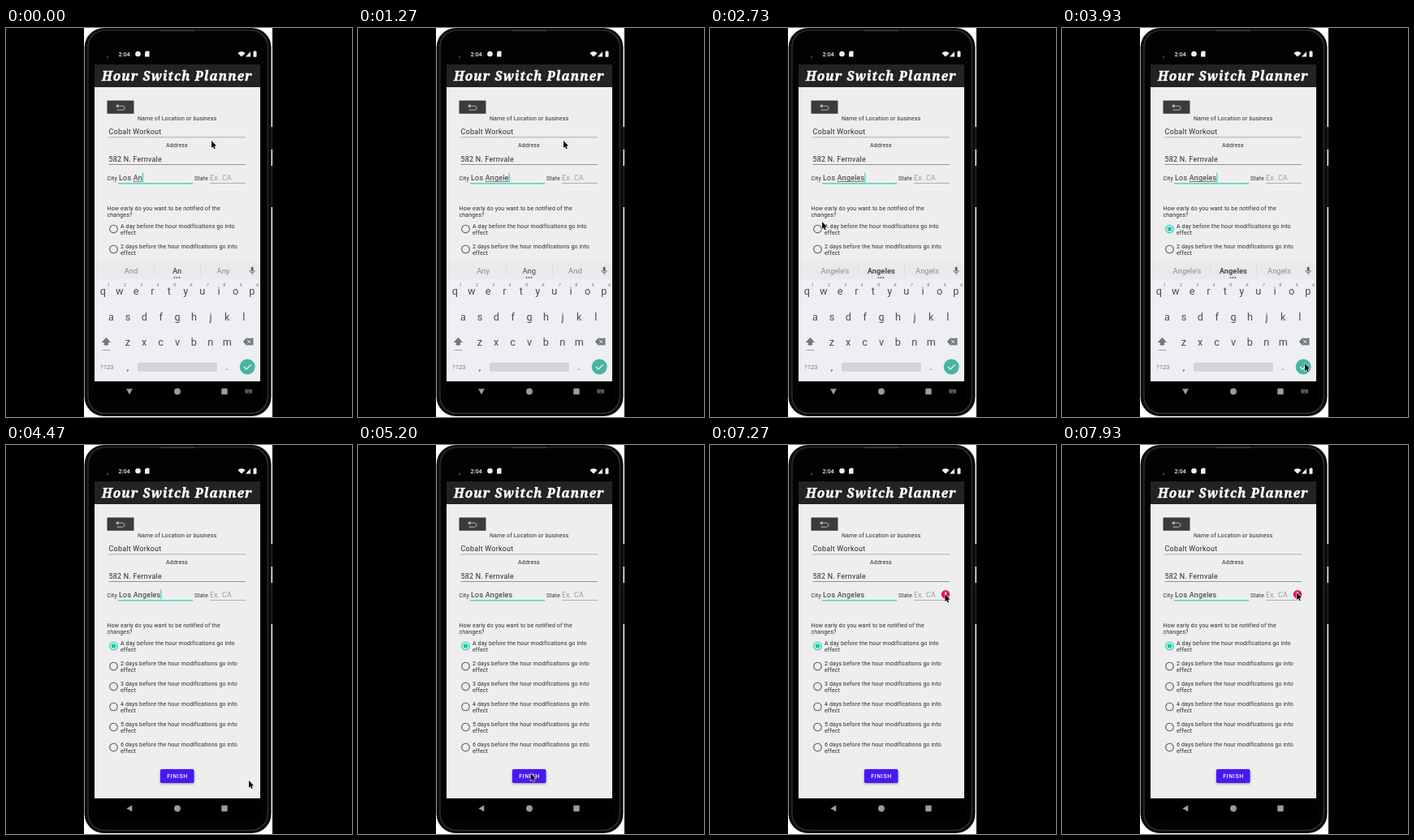
An HTML page with a canvas for the animation above (8000 ms loop, 426 by 480 pixels).

```html
<!DOCTYPE html>
<html lang="en">
<head>
<meta charset="utf-8">
<title>Form entry</title>
<style>
html, body { margin: 0; width: 100%; height: 100%; overflow: hidden; background: #000; }
canvas { display: block; width: 426px; height: 480px; }
</style>
</head>
<body>
<canvas id="stage"></canvas>
<script>
const W = 426, H = 480, LOOP = 8000;
const canvas = document.getElementById('stage');
const dpr = window.devicePixelRatio || 1;
canvas.width = W * dpr;
canvas.height = H * dpr;
const ctx = canvas.getContext('2d');

const TEAL = '#19c9b5', INK = '#2a2a2a';
const typed = [[0, 'An'], [400, 'Ang'], [930, 'Ange'], [1070, 'Angel'], [1270, 'Angele'], [1470, 'Angeles']];
const hints = [
  [0, { words: ['And', 'An', 'Any'], weight: 500 }],
  [500, { words: ['Any', 'Ang', 'And'], weight: 400 }],
  [1330, { words: ['Angel', 'Angele', 'Angels'], weight: 400 }],
  [1670, { words: ["Angele's", 'Angeles', 'Angels'], weight: 700 }]
];
const pointerPath = [
  [0, 253, 139], [1880, 253, 139], [1930, 250, 152], [2010, 250, 152], [2330, 141, 235],
  [2450, 141, 235], [2730, 138, 239], [2870, 131, 245], [3210, 131, 245], [3800, 297, 411],
  [3930, 299, 414], [4810, 299, 414], [4930, 252, 409], [5010, 252, 409], [5200, 212.5, 405],
  [6210, 212.5, 405], [6600, 290, 211], [6740, 290, 211], [6930, 293, 203], [7040, 293, 203],
  [7330, 289, 182], [8000, 289, 182]
];
const CHECKED = 3130, CLOSING = 4130, PRESSED = 5870, INVALID = 5930;

const latest = (list, t) => list.filter(item => item[0] <= t).pop()[1];
const clamp = v => Math.max(0, Math.min(1, v));
const smooth = v => v * v * (3 - 2 * v);

function pointerAt(t) {
  const i = Math.max(1, pointerPath.findIndex(p => p[0] > t));
  const a = pointerPath[i - 1], b = pointerPath[i];
  const k = smooth((t - a[0]) / (b[0] - a[0]));
  return [a[1] + (b[1] - a[1]) * k, a[2] + (b[2] - a[2]) * k];
}

function rect(x, y, w, h, color, r = 0) {
  ctx.fillStyle = color;
  ctx.beginPath();
  ctx.roundRect(x, y, w, h, r);
  ctx.fill();
}

function circle(x, y, r, color) {
  ctx.fillStyle = color;
  ctx.beginPath();
  ctx.arc(x, y, r, 0, Math.PI * 2);
  ctx.fill();
}

function poly(points, color) {
  ctx.fillStyle = color;
  ctx.beginPath();
  points.forEach(([x, y]) => ctx.lineTo(x, y));
  ctx.closePath();
  ctx.fill();
}

function line(points, color, width = 1) {
  ctx.strokeStyle = color;
  ctx.lineWidth = width;
  ctx.beginPath();
  points.forEach(([x, y]) => ctx.lineTo(x, y));
  ctx.stroke();
}

function text(str, x, y, { size = 7, color = INK, align = 'left', weight = 400, gap = 0.15,
                          family = 'Roboto, sans-serif', style = '' } = {}) {
  ctx.font = `${style} ${weight} ${size}px ${family}`;
  ctx.letterSpacing = gap + 'px';
  ctx.textAlign = align;
  ctx.fillStyle = color;
  ctx.fillText(str, x, y);
  return ctx.measureText(str).width;
}

const field = (str, x, y, color = INK) => text(str, x, y, { size: 8.93, gap: 0.25, color });

function drawPhone() {
  rect(0, 0, W, H, '#000');
  rect(96, 0, 232, H, '#fff');
  rect(326, 122, 2, 28, '#25292c');
  rect(326, 170, 2, 51, '#25292c');
  rect(96.6, 0, 230, 479, '#0c0c0c', 24);
  rect(100.4, 2.4, 222.4, 473.6, '#353535', 21);
  rect(101.6, 3.6, 220, 471.2, '#020202', 20);
  rect(190, 2.5, 42, 1.5, '#3a3a3a', 0.7);
}

function drawStatusBar() {
  const white = '#f2f2f2';
  circle(125, 36, 1.3, '#39424a');
  text('2:04', 138.5, 34.5, { size: 7.2, color: white, weight: 500, gap: 0 });
  circle(162.5, 32, 3.3, white);
  poly([[172.5, 28.5], [176.5, 28.5], [176.5, 35.5], [171, 35.5], [171, 30.3]], white);
  ctx.fillStyle = white;
  ctx.beginPath();
  ctx.moveTo(290, 35.5);
  ctx.arc(290, 35.5, 6.5, -Math.PI * 0.75, -Math.PI * 0.25);
  ctx.fill();
  poly([[295, 35.5], [301, 35.5], [301, 29]], white);
  rect(304.5, 29, 4, 6.7, white, 0.6);
  rect(305.6, 28.2, 1.8, 1.2, white);
}

function drawHeader() {
  const title = 'Hour Switch Planner';
  rect(109, 45, 204, 28, '#222325');
  text(title, 210.8, 64.5, {
    size: 15.4, color: '#fff', align: 'center', weight: 900, gap: 1.1, style: 'italic',
    family: '"Noto Serif", serif'
  });
  ctx.strokeStyle = '#fff';
  ctx.lineWidth = 0.5;
  ctx.strokeText(title, 210.8, 64.5);
}

function drawBackButton() {
  const gray = '#b8b8b8';
  rect(124.5, 89.5, 33, 16.3, '#3b3b3d');
  ctx.strokeStyle = gray;
  ctx.lineWidth = 1;
  ctx.beginPath();
  ctx.moveTo(137, 96.2);
  ctx.lineTo(143.5, 96.2);
  ctx.arc(143.5, 98.7, 2.5, -Math.PI / 2, Math.PI / 2);
  ctx.lineTo(136.5, 101.2);
  ctx.stroke();
  poly([[135, 96.2], [138.3, 93.6], [138.3, 98.8]], gray);
}

function drawRadio(i, on) {
  const y = 248 + 25 * i;
  ctx.strokeStyle = on ? TEAL : '#5c5c5c';
  ctx.lineWidth = 1.1;
  ctx.beginPath();
  ctx.arc(132.5, y, 4.8, 0, Math.PI * 2);
  ctx.stroke();
  if (on) circle(132.5, y, 2.8, TEAL);
  const when = i ? `${i + 1} days` : 'A day';
  text(`${when} before the hour modifications go into`, 141, y - 1);
  text('effect', 141, y + 7.3);
}

function drawFinish(t) {
  ctx.save();
  ctx.shadowColor = 'rgba(0,0,0,.4)';
  ctx.shadowBlur = 3 * dpr;
  ctx.shadowOffsetY = dpr;
  rect(190, 400, 41.5, 17, '#4a17f2', 1.8);
  ctx.restore();
  const glow = t < PRESSED ? 0 : 0.2 * clamp(1 - (t - PRESSED) / 300);
  if (glow) rect(190, 400, 41.5, 17, `rgba(255,255,255,${glow})`, 1.8);
  text('FINISH', 211, 411, { size: 7, color: '#fff', align: 'center', weight: 500, gap: 0.62 });
}

function drawCity(t) {
  const word = latest(typed, t);
  const lead = field('Los ', 139, 188);
  const end = 139 + lead + field(word, 139 + lead, 188);
  rect(138, 191.2, 92, 1.3, '#2fc9b8');
  if (t < CLOSING) rect(139 + lead, 189.2, end - 139 - lead, 0.7, '#555');
  const blink = Math.floor((t - 1470) / 495);
  if (t < 1470 || blink % 2 === 0) rect(end, 178.5, 1, 11.8, TEAL);
}

function drawError() {
  circle(290, 184.2, 5.2, '#ed1540');
  rect(289.3, 181, 1.5, 4, '#fff', 0.3);
  rect(289.3, 186, 1.5, 1.5, '#fff', 0.3);
}

function drawForm(t) {
  rect(109, 73, 204, 363, '#eeeeef');
  drawBackButton();
  text('Name of Location or business', 210.7, 114, { align: 'center' });
  field('Cobalt Workout', 126.5, 131);
  rect(126, 134.4, 169, 0.9, '#999');
  text('Address', 210.5, 147.3, { align: 'center' });
  field('582 N. Fernvale', 126.5, 164.5);
  rect(126, 167.9, 169, 0.9, '#777');
  text('City', 124.5, 187.6);
  drawCity(t);
  text('State', 232, 187.6);
  field('Ex. CA', 251, 188, '#999');
  rect(251, 191.2, 44, 0.9, '#999');
  if (t >= INVALID) drawError();
  text('How early do you want to be notified of the', 124.5, 225);
  text('changes?', 124.5, 233.3);
  for (let i = 0; i < 6; i++) drawRadio(i, i === 0 && t >= CHECKED);
  drawFinish(t);
}

function drawSuggestions(t) {
  const { words, weight } = latest(hints, t);
  words.forEach((word, i) => {
    const mid = i === 1;
    text(word, 154 + 56.7 * i, 303, {
      size: 9.4, align: 'center', gap: 0, color: mid ? '#45494c' : '#858a8d', weight: mid ? weight : 400
    });
  });
  [182.5, 239].forEach(x => rect(x, 293, 0.7, 13, '#d6d9db'));
  [-3, 0, 3].forEach(dx => circle(210.5 + dx, 308, 0.9, '#555'));
  rect(301.7, 294.5, 3, 6, '#666', 1.5);
  ctx.strokeStyle = '#666';
  ctx.lineWidth = 0.9;
  ctx.beginPath();
  ctx.arc(303.2, 299, 3.1, 0, Math.PI);
  ctx.moveTo(303.2, 302);
  ctx.lineTo(303.2, 304.5);
  ctx.stroke();
}

function drawKeyboard(t) {
  const ink = '#4a4d50', iconGray = '#74787b', back = '#edeff2';
  rect(109, 289, 204, 147, back);
  rect(109, 289, 204, 21, '#e8eaec');
  drawSuggestions(t);
  [['qwertyuiop', 119.3, 329.3], ['asdfghjkl', 129.5, 360.5], ['zxcvbnm', 149.8, 391.5]]
    .forEach(([keys, x, y]) => [...keys].forEach((key, i) =>
      text(key, x + 20.4 * i, y, { size: 12.7, color: ink, align: 'center', gap: 0 })));
  for (let i = 0; i < 10; i++) {
    text(String((i + 1) % 10), 126 + 20.4 * i, 318.7, { size: 5.7, color: '#777', align: 'center', gap: 0 });
  }
  poly([[123.3, 381.8], [129, 388], [126, 388], [126, 391.5], [120.6, 391.5], [120.6, 388], [117.6, 388]], iconGray);
  rect(118.8, 397, 9, 0.9, '#9a94a8');
  poly([[292, 387], [295.5, 382.8], [304.5, 382.8], [304.5, 391.2], [295.5, 391.2]], iconGray);
  line([[297, 384.8], [301.4, 389.2]], back);
  line([[301.4, 384.8], [297, 389.2]], back);
  text('?123', 124.3, 421.2, { size: 7.6, color: '#777', align: 'center', gap: 0 });
  text(',', 150, 421.5, { size: 12.5, color: ink, align: 'center', gap: 0 });
  rect(162, 412.7, 98, 11.3, '#d2d4d6', 1.5);
  text('.', 272, 421.5, { size: 12.5, color: ink, align: 'center', gap: 0 });
  circle(297.2, 418, 9.5, '#47b5a4');
  line([[293, 418.2], [296, 421.2], [301.7, 415.3]], '#fff', 1.2);
}

function drawNavBar(closed) {
  const gray = '#9c9c9c';
  rect(109, 436, 204, 26, '#000');
  ctx.save();
  ctx.translate(152, 448.5);
  ctx.rotate(closed * Math.PI / 2);
  poly([[-4, -3.3], [4, -3.3], [0, 3.7]], gray);
  ctx.restore();
  circle(211, 448.5, 3.9, gray);
  rect(265.3, 444.8, 7.4, 7.4, gray, 0.6);
  if (closed < 1) {
    ctx.globalAlpha = 1 - closed;
    rect(294.5, 445.7, 8.5, 5, '#666', 0.6);
    for (let i = 0; i < 3; i++) {
      rect(296 + i * 2.2, 446.8, 0.9, 0.9, '#000');
    }
    rect(296.8, 448.9, 4, 0.8, '#000');
    ctx.globalAlpha = 1;
  }
}

function drawPointer([x, y]) {
  const shape = [[0, 0], [0, 9], [2, 7.2], [3.4, 10.3], [4.8, 9.7], [3.4, 6.6], [6.2, 6.4]]
    .map(([dx, dy]) => [x + dx, y + dy]);
  line([...shape, shape[0]], 'rgba(255,255,255,.85)', 1.2);
  poly(shape, '#080808');
}

function draw(t) {
  ctx.setTransform(dpr, 0, 0, dpr, 0, 0);
  const closed = smooth(clamp((t - CLOSING) / 270));
  drawPhone();
  drawStatusBar();
  drawHeader();
  drawForm(t);
  if (closed < 1) {
    ctx.save();
    ctx.beginPath();
    ctx.rect(109, 73, 204, 363);
    ctx.clip();
    ctx.translate(0, 147 * closed);
    drawKeyboard(t);
    ctx.restore();
  }
  drawNavBar(closed);
  drawPointer(pointerAt(t));
}

const start = performance.now();
function tick() {
  draw((performance.now() - start) % LOOP);
  requestAnimationFrame(tick);
}
tick();
</script>
</body>
</html>
```
